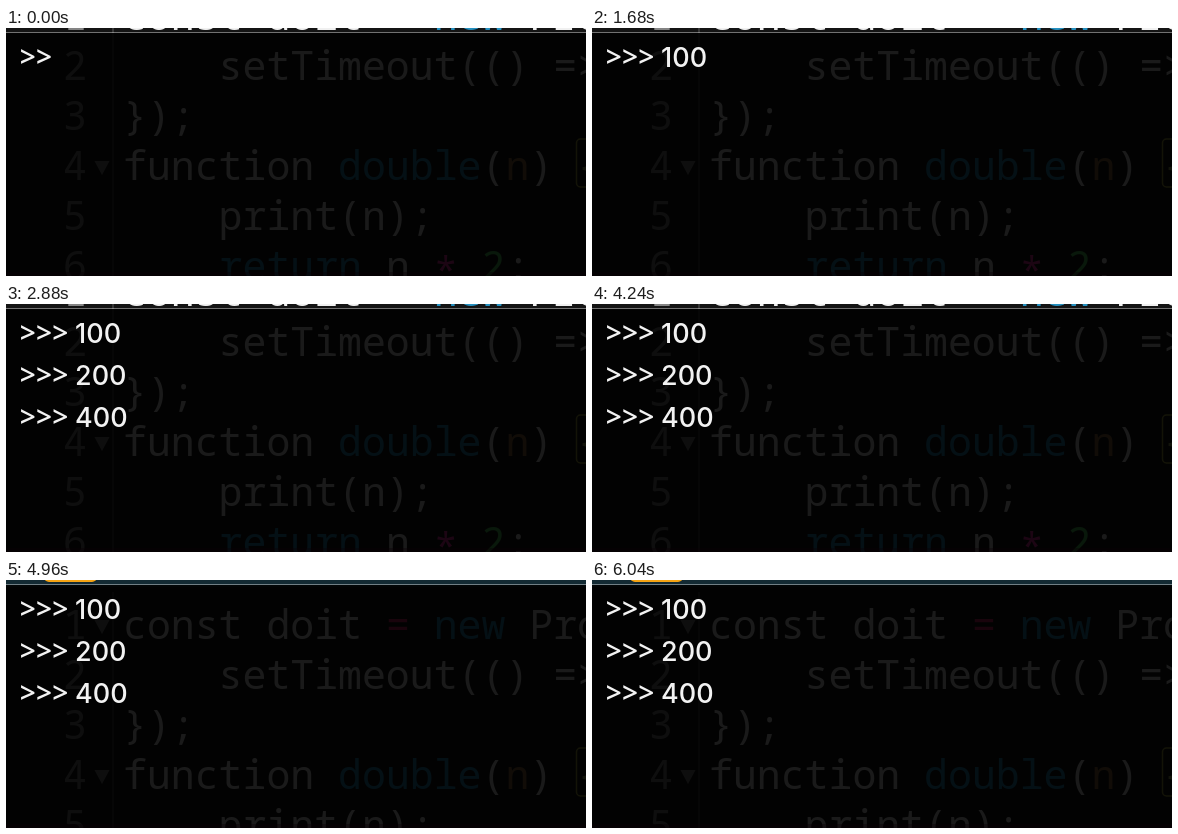
Write an HTML page that moves like this. It is 580 px wide and 248 px high and loops after 6.2 s.

```html
<!DOCTYPE html>
<html lang="en">
<head>
<meta charset="utf-8">
<title>Console output over code</title>
<style>
  html, body { margin: 0; width: 100%; height: 100%; overflow: hidden; background: #000; }
  svg { display: block; width: 580px; height: 248px; }
  text { white-space: pre; }
  #code text { font: 39.83px "Noto Sans Mono", "DejaVu Sans Mono", monospace; font-variant-ligatures: none; }
  .prompt { font: 600 28px "Open Sans", "Noto Sans", sans-serif; letter-spacing: .3px; font-variant-ligatures: none; }
  .value { font: 500 27px Inter, Roboto, sans-serif; }
  #console { fill: #f2f2f2; }
</style>
</head>
<body>
<svg viewBox="0 0 580 248">
  <rect width="580" height="248" fill="#141414"/>
  <g id="code">
    <rect y="-100" width="580" height="50" fill="#132a33"/>
    <rect x="38" y="-90" width="53" height="35" rx="5" fill="#f5a313"/>
    <rect x="106.5" y="-45" width="1" height="400" fill="#5a5a5a"/>
    <rect x="570.5" y="111" width="40" height="48" rx="4" fill="none" stroke="#b0b040" stroke-width="1.5"/>
  </g>
  <rect y="5" width="580" height="243" fill="#000" fill-opacity=".89"/>
  <rect y="4" width="580" height="1" fill="#fff" fill-opacity=".4"/>
  <rect y="244" width="580" height="4" fill="#0a0006" fill-opacity=".4"/>
  <g id="console"></g>
</svg>
<script>
  const LOOP = 6200, LEFT = 117, PITCH = 23.9, ROW = 50, SCROLL = 57;
  const WHITE = '#f0f0f0', BLUE = '#2590c0', PINK = '#e0266a', GREY = '#848484';
  const code = document.getElementById('code');
  const output = document.getElementById('console');

  function add(parent, tag, attrs, content = '') {
    const el = document.createElementNS('http://www.w3.org/2000/svg', tag);
    for (const key in attrs) el.setAttribute(key, attrs[key]);
    el.textContent = content;
    return parent.appendChild(el);
  }

  // Tokens per line: column, text, colour, optional vertical shift
  const lines = [
    [[0, 'const doit', WHITE], [11, '=', PINK], [13, 'new', BLUE], [17, 'Promise', WHITE]],
    [[4, 'setTimeout(() =>', WHITE]],
    [[0, '});', WHITE]],
    [[0, 'function', WHITE], [9, 'double', BLUE], [15, '(', WHITE], [16, 'n', '#9a7040'],
     [17, ')', WHITE], [19, '{', '#a0b060']],
    [[4, 'print(n);', WHITE]],
    [[4, 'return', BLUE], [11, 'n', WHITE], [13, '*', '#ff30b0', 5], [15, '2', '#50d860'], [16, ';', WHITE]]
  ];

  lines.forEach((tokens, i) => {
    const y = 2 + i * ROW;
    add(code, 'text', { x: 57, y, fill: GREY }, String(i + 1));
    for (const [col, text, fill, dy = 0] of tokens)
      add(code, 'text', { x: LEFT + col * PITCH, y: y + dy, fill }, text);
  });
  for (const row of [0, 3])
    add(code, 'path', { d: `M88.5 ${row * ROW - 17}h15l-7.5 14z`, fill: GREY });

  const rows = ['100', '200', '400'].map((value, i) => {
    const y = 39.3 + i * 42;
    const prompt = add(output, 'text', { class: 'prompt', x: 13.8, y });
    const number = add(output, 'text', { class: 'value', x: 69, y });
    return { value, prompt, number };
  });

  // Start time, prompt characters, printed rows, scroll position
  const steps = [
    [0, 2, 0, 0],
    [460, 0, 0, 0],
    [1680, 3, 1, 0],
    [2880, 3, 3, 0],
    [4960, 3, 3, SCROLL]
  ];

  let current;
  function draw(step) {
    const [, chars, count, shift] = step;
    rows.forEach((row, i) => {
      const done = i < count;
      row.prompt.textContent = done || i === 0 ? '>'.repeat(chars) : '';
      row.number.textContent = done ? row.value : '';
    });
    code.setAttribute('transform', `translate(0 ${shift})`);
    current = step;
  }

  function tick() {
    const t = performance.now() % LOOP;
    const step = steps.findLast(s => s[0] <= t);
    if (step !== current) draw(step);
    requestAnimationFrame(tick);
  }
  tick();
</script>
</body>
</html>
```
